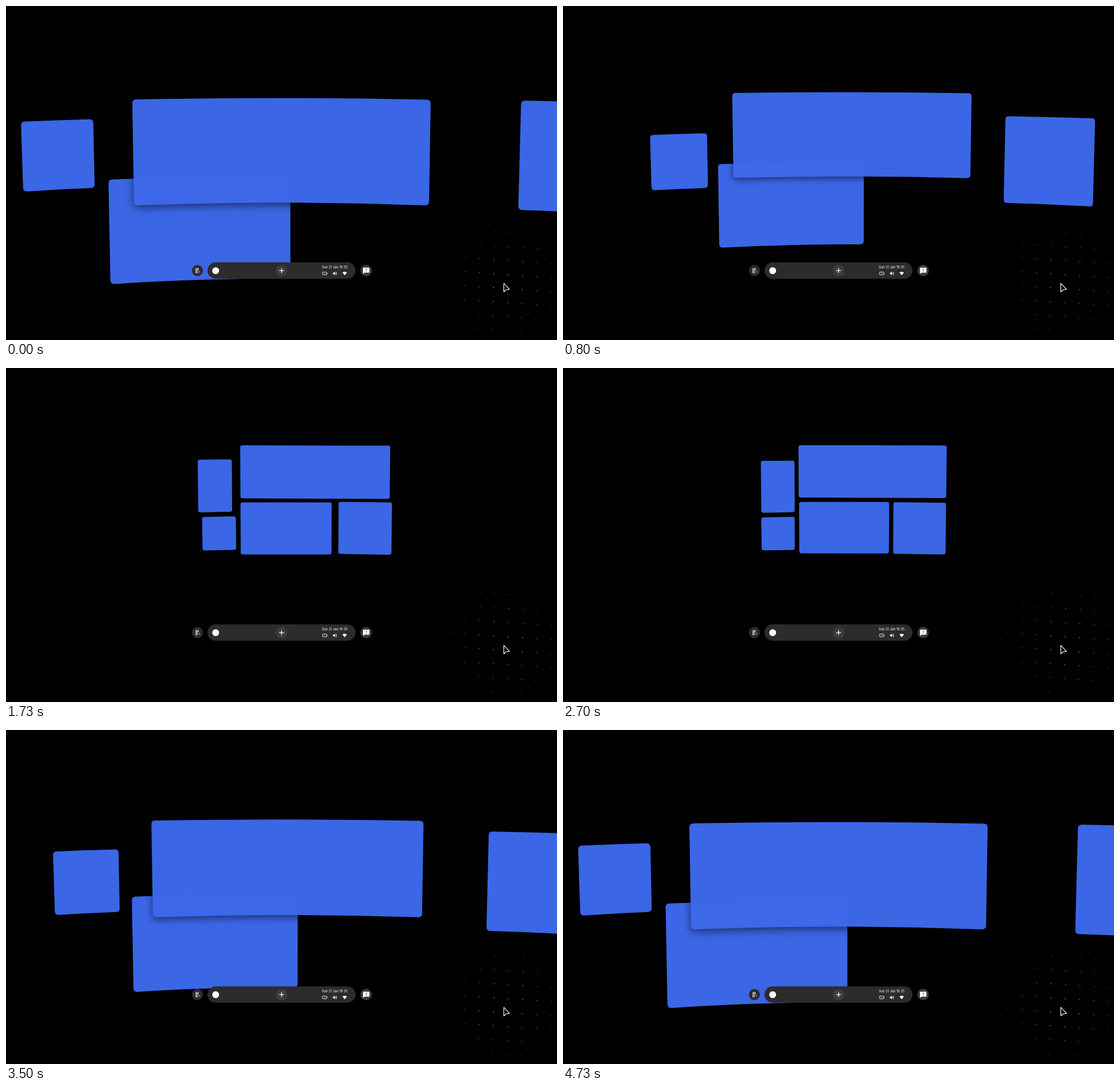
An HTML page for the animation above (4760 ms loop, 960x583 px).

```html
<!DOCTYPE html>
<html lang="en">
<head>
<meta charset="utf-8">
<title>Panels gathering</title>
<style>
  html, body { margin: 0; width: 100%; height: 100%; overflow: hidden; background: #000; }
  svg { display: block; width: 960px; height: 583px; }
</style>
</head>
<body>
<svg viewBox="0 0 960 583" xmlns="http://www.w3.org/2000/svg">
  <defs>
    <filter id="soft" x="-20%" y="-30%" width="140%" height="160%">
      <feGaussianBlur id="blur" stdDeviation="7"/>
    </filter>
  </defs>
  <rect width="960" height="583" fill="#000"/>
  <g id="dots" fill="#fff"></g>
  <g id="panels"></g>

  <g id="dock">
    <circle cx="333.5" cy="461.8" r="9.7" fill="#2c2c2d"/>
    <path d="M330 457.5h6v4h-2v5h-4z" fill="#a2a2a2"/>
    <path d="M334.5 464h3.5m-1.5-1.6 1.6 1.6-1.6 1.6" fill="none" stroke="#a2a2a2" stroke-width=".9"/>
    <circle cx="332.6" cy="462.3" r=".6" fill="#2c2c2d"/>

    <rect x="351" y="447.5" width="258" height="28.5" rx="14.25" fill="#2c2c2d"/>
    <circle cx="365.3" cy="462" r="6" fill="#fff"/>
    <circle cx="480.2" cy="461.9" r="10" fill="#3d3d3e"/>
    <path d="M476 461.9h8.4M480.2 457.7v8.4" stroke="#fff" stroke-width="1.3"/>

    <text x="572.7" y="458" text-anchor="middle" font-family="Inter, sans-serif" font-size="5.6" font-weight="500" fill="#e2e2ea">Sun 21 Jan 19:35</text>
    <rect x="551.4" y="464.4" width="7.4" height="4.8" rx=".8" fill="none" stroke="#f0f0f0" stroke-width=".9"/>
    <path d="M559.6 465.8v2M553.6 466.8h1.2M555.6 466.8h1.2" stroke="#f0f0f0" stroke-width=".8"/>
    <path d="M569.6 465.6h1.5l2-1.9v6.2l-2-1.9h-1.5z" fill="#fff"/>
    <path d="M574.2 465.2q1.3 1.6 0 3.2M575 463.8q2.4 3 0 6" fill="none" stroke="#fff" stroke-width=".75"/>
    <path d="M586.2 465.3q3.9-3 7.8 0l-3.9 4.6z" fill="#fff"/>

    <circle cx="627.4" cy="461.8" r="10" fill="#3a3a3b"/>
    <path d="M622.8 456.7h9.6q.8 0 .8.8v7.2q0 .8-.8.8h-8l-2.4 2.3v-10.3q0-.8.8-.8z" fill="#fff"/>
    <path d="M627.7 458.4v3.2M627.7 462.6v1.2" stroke="#333" stroke-width="1.1"/>
  </g>
  <path d="M867.4 484.2v14.9l3.8-3.6 6-.9z" fill="#000" stroke="#fff" stroke-width="1.2" stroke-linejoin="round"/>
</svg>
<script>
const NS = 'http://www.w3.org/2000/svg';
const LOOP = 4760, RATE = 5.45 / 1000, GATHER = 552, SPREAD = 2919;
const $ = id => document.getElementById(id);

function add(parent, tag, attrs) {
  const el = document.createElementNS(NS, tag);
  for (const k in attrs) el.setAttribute(k, attrs[k]);
  return parent.appendChild(el);
}

// Corners clockwise from top left: spread pose, gathered pose, then edge bow (top, bottom).
const panels = [
  { from: [-547, -12, -421.5, -17, -414, 185, -540, 191],
    to: [334, 160, 393.5, 159.5, 394, 251, 335, 252], bow: [0, 0] },
  { from: [26, 202, 152, 197.5, 154.5, 317.5, 30, 324],
    to: [341.5, 260, 400.5, 259, 401, 317.5, 342.5, 318.5], bow: [-.3, -.4] },
  { from: [178.5, 303, 495.5, 297, 495.5, 475.5, 182, 485.5],
    to: [408.5, 234.5, 567.5, 234.5, 567, 325.5, 409, 325.5], bow: [-1.5, -2.7] },
  { from: [897.5, 165, 1095.5, 170.7, 1089.6, 365.7, 892.5, 356],
    to: [579.5, 233.5, 672.5, 234.5, 671.5, 326, 579, 324.5], bow: [-.4, -.8] },
  { from: [220, 163, 740, 163.5, 737, 348, 223, 348],
    to: [408, 135, 669.5, 135.5, 668.5, 228.5, 408.5, 227.5], bow: [-2.5, -4.7], shadow: true }
];

for (const p of panels) {
  if (p.shadow) p.shade = add($('panels'), 'path', { filter: 'url(#soft)', opacity: .55 });
  p.el = add($('panels'), 'path', { fill: '#3e6aee', 'fill-opacity': .965 });
}

// Faint grid lit around the pointer
for (let j = -5; j < 6; j++) for (let i = -5; i < 6; i++) {
  const x = 875 + 25 * i - .55 * j, y = 469 + 1.7 * i + 24.4 * j;
  const glow = 1 - Math.hypot(x - 872, y - 482) / 112;
  if (glow > 0) add($('dots'), 'circle', { cx: x, cy: y, r: .85, opacity: Math.min(.62, .1 + .6 * glow) });
}

const mix = (a, b, k) => a + (b - a) * k;
const fmt = (x, y) => x.toFixed(2) + ' ' + y.toFixed(2);

function toward(a, b, d) {
  const k = d / Math.hypot(b[0] - a[0], b[1] - a[1]);
  return [mix(a[0], b[0], k), mix(a[1], b[1], k)];
}

function outline(p, k) {
  const c = [0, 2, 4, 6].map(i => [mix(p.from[i], p.to[i], k), mix(p.from[i + 1], p.to[i + 1], k)]);
  const r = mix(7, 3.8, k), flat = Math.max(0, 1 - k);
  const bow = [p.bow[0], 0, p.bow[1], 0];
  let d = '';
  c.forEach((a, i) => {
    const b = c[(i + 1) % 4], s = toward(a, b, r), e = toward(b, a, r);
    const my = (s[1] + e[1]) / 2 + 2 * bow[i] * flat;
    d += (i ? 'L' : 'M') + fmt(...s) + 'Q' + fmt((s[0] + e[0]) / 2, my) + ' ' + fmt(...e);
    d += 'Q' + fmt(...b) + ' ' + fmt(...toward(b, c[(i + 2) % 4], r));
  });
  return d + 'Z';
}

// Critically damped spring
function spring(ms) {
  const x = Math.max(0, ms) * RATE;
  return 1 - (1 + x) * Math.exp(-x);
}

function draw(t) {
  const p = t < 600 ? 0 : t < SPREAD ? spring(t - GATHER) : 1 - spring(t - SPREAD);
  const k = p / .988;
  $('blur').setAttribute('stdDeviation', mix(7.5, 3.5, k));
  for (const q of panels) {
    const d = outline(q, k);
    q.el.setAttribute('d', d);
    if (q.shade) {
      q.shade.setAttribute('d', d);
      q.shade.setAttribute('transform', `translate(0 ${mix(4, 2, k).toFixed(2)})`);
    }
  }
}

const start = performance.now();
function tick() {
  draw((performance.now() - start) % LOOP);
  requestAnimationFrame(tick);
}
tick();
</script>
</body>
</html>
```
